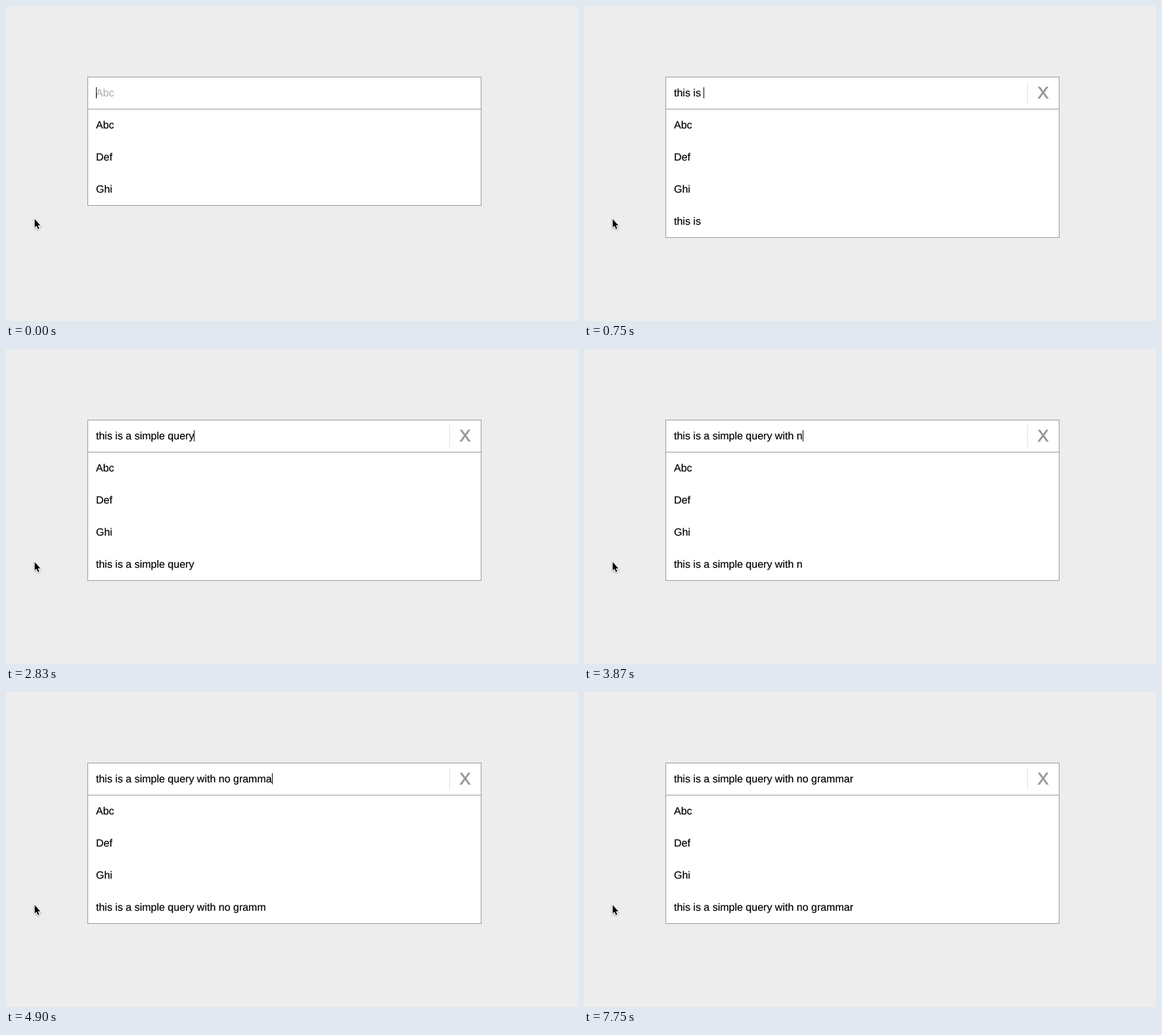
An HTML page that plays this animation: 871x481 px, repeating every 8 s.

```html
<!DOCTYPE html>
<html lang="en">
<head>
<meta charset="utf-8">
<title>Search suggestions</title>
<style>
  html, body { margin: 0; width: 100%; height: 100%; overflow: hidden; background: #ededed; }
  svg { display: block; }
  text {
    font: 16px "Liberation Sans", Arial, sans-serif;
    fill: currentColor;
    stroke: currentColor;
    stroke-width: .2;
    white-space: pre;
    text-rendering: geometricPrecision;
  }
  .frame { fill: #fff; stroke: #999; }
  .placeholder { color: #b4b4b4; }
  .clear { font-size: 25px; color: #999; stroke-width: .9; text-anchor: middle; }
  .pointer { stroke: #fff; stroke-width: 2; paint-order: stroke; filter: drop-shadow(0 1px 1px #0005); }
</style>
</head>
<body>
<svg width="871" height="481">
  <rect id="list" class="frame" x="124.5" y="108.5" width="599"/>
  <path d="M125 157.5H723" stroke="#999"/>
  <text id="input" x="137" y="138"></text>
  <rect id="caret" y="124" width="1" height="17"/>
  <g id="button">
    <path id="divider" d="M.5 116V150" stroke="#e2e2e2"/>
    <text id="clear" class="clear" y="141">X</text>
  </g>
  <g id="rows"></g>
  <path class="pointer" d="M43.7 325.3V338.2L46.5 335.6L48.6 340.4L50.6 339.5L48.5 334.9H52.3Z"/>
</svg>
<script>
const LOOP = 8000, STEP = 149, ROW = 49, LEFT = 137, RIGHT = 723;

// Text typed at an even pace between pauses.
const BURSTS = [
  { start: 150, steps: 8, text: "this is a si" },
  { start: 1940, steps: 7, text: "mple query" },
  { start: 3130, steps: 8, text: " with no " },
  { start: 4320, steps: 5, text: "grammar" },
  { start: 6850, steps: 3, text: "   " }
];

const el = id => document.getElementById(id);
const input = el("input"), caret = el("caret");

const rows = ["Abc", "Def", "Ghi", ""].map((label, i) => {
  const row = document.createElementNS("http://www.w3.org/2000/svg", "text");
  row.setAttribute("x", LEFT);
  row.setAttribute("y", 187 + i * ROW);
  row.textContent = label;
  return el("rows").appendChild(row);
});
const suggestion = rows.at(-1);

function typing(t) {
  let query = "", suggested = "", lastKey = 0;
  for (const { start, steps, text } of BURSTS) {
    if (t < start) break;
    const step = Math.min(steps, 1 + Math.floor((t - start + 10) / STEP));
    const typedBy = n => Math.round(text.length * n / steps);
    const typed = typedBy(step);
    // Of two keys pressed in one step, only the first is suggested yet.
    suggested = query + text.slice(0, Math.min(typed, typedBy(step - 1) + 1));
    query += text.slice(0, typed);
    lastKey = start + (step - 1) * STEP;
  }
  return { query, suggested, idle: t - lastKey };
}

// Solid for 600 ms after a key, then toggling every 450 ms.
const caretVisible = idle => idle < 600 || Math.floor((idle - 600) / 450) % 2 === 1;

const show = (node, visible) => node.setAttribute("visibility", visible ? "visible" : "hidden");

function placeButton(width) {
  el("divider").setAttribute("transform", `translate(${RIGHT - width})`);
  el("clear").setAttribute("x", RIGHT - width / 2);
}

function draw(t) {
  const { query, suggested, idle } = typing(t);
  const empty = !query;

  input.textContent = query || "Abc";
  input.classList.toggle("placeholder", empty);
  suggestion.textContent = suggested;

  const textWidth = empty ? 0 : input.getComputedTextLength();
  caret.setAttribute("x", Math.round(LEFT + textWidth));
  show(caret, caretVisible(idle));

  el("list").setAttribute("height", ROW * (empty ? 4 : 5));
  show(el("button"), !empty);
  placeButton(query.length < 3 ? 23 : 48);
}

function tick() {
  draw(performance.now() % LOOP);
  requestAnimationFrame(tick);
}
tick();
</script>
</body>
</html>
```
